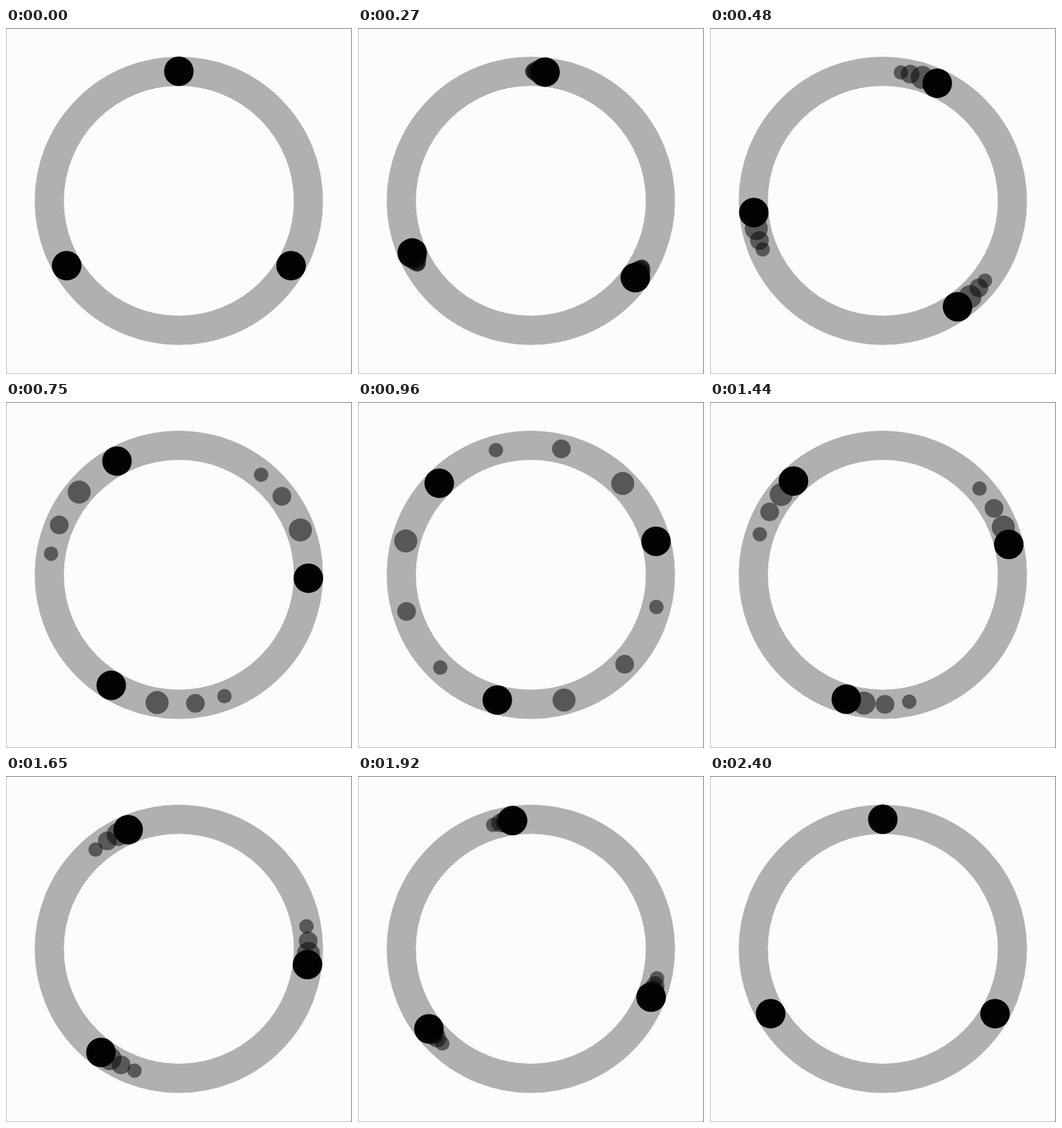
Animation of 480x480 px, one loop 2700 ms. Source, as an HTML page with a canvas:

```html
<!DOCTYPE html>
<html lang="en">
<head>
<meta charset="utf-8">
<title>Orbiting dots</title>
<style>
  html, body { margin: 0; width: 100%; height: 100%; overflow: hidden; background: #fcfcfc; }
  canvas { display: block; }
</style>
</head>
<body>
<canvas id="stage" width="480" height="480"></canvas>
<script>
const ctx = document.getElementById('stage').getContext('2d');
const LOOP = 2700, TURN = 2400, LAG = 60;
const CENTER = 239.8, RADIUS = 179.75;
const SIZES = [20.5, 16, 13, 10]; // leading dot, then its trail

// cubic-bezier(.55, 0, .15, 1), solved by bisection
function ease(x) {
  if (x <= 0) return 0;
  if (x >= 1) return 1;
  let lo = 0, hi = 1, s;
  for (let i = 0; i < 30; i++) {
    s = (lo + hi) / 2;
    const bx = 3 * s * (1 - s) ** 2 * .55 + 3 * s * s * (1 - s) * .15 + s ** 3;
    if (bx < x) lo = s; else hi = s;
  }
  return s * s * (3 - 2 * s);
}

function circle(x, y, r) {
  ctx.beginPath();
  ctx.arc(x, y, r, 0, 2 * Math.PI);
}

function drawFrame() {
  ctx.fillStyle = '#fcfcfc';
  ctx.fillRect(0, 0, 480, 480);
  ctx.fillStyle = '#c4c4c4';
  ctx.fillRect(0, 0, 1, 480);
  ctx.fillRect(0, 479, 480, 1);
  ctx.fillStyle = '#888';
  ctx.fillRect(0, 0, 480, 1);
  ctx.fillRect(479, 0, 1, 480);
}

function draw(now) {
  const t = now % LOOP;
  drawFrame();
  circle(CENTER, CENTER, RADIUS);
  ctx.lineWidth = 40.5;
  ctx.strokeStyle = '#b0b0b0';
  ctx.stroke();

  for (let i = SIZES.length - 1; i >= 0; i--) {
    const turn = ease((t - i * LAG) / TURN);
    ctx.fillStyle = i ? 'rgba(0, 0, 0, .5)' : '#030303';
    for (let k = 0; k < 3; k++) {
      const a = 2 * Math.PI * (turn + k / 3);
      circle(CENTER + RADIUS * Math.sin(a), CENTER - RADIUS * Math.cos(a), SIZES[i]);
      ctx.fill();
    }
  }
  requestAnimationFrame(draw);
}
draw(0);
</script>
</body>
</html>
```
